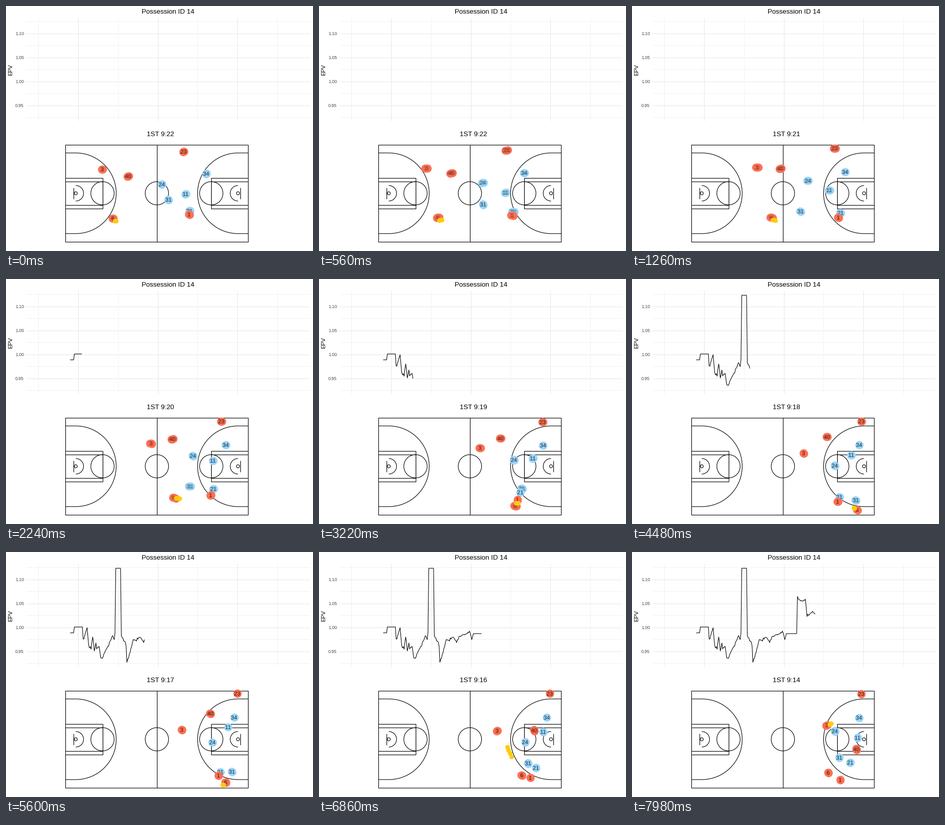
These frames come from a looping animation (600 by 480 pixels, 8000 ms). A matplotlib script:

```python
import numpy as np
import matplotlib.pyplot as plt
from matplotlib.animation import FuncAnimation
from matplotlib.collections import LineCollection, PathCollection
from matplotlib.textpath import TextPath
from matplotlib.transforms import Affine2D

W, H, DPI = 600, 480, 100
PX = 72 / DPI                 # points per pixel
TICK, LOOP, HOLD = 20, 8000, 140
FONT = "Liberation Sans"
RED, BLUE, GOLD = "#fd7053", "#9ad6fc", "#ffcb0a"

fig = plt.figure(figsize=(W / DPI, H / DPI), dpi=DPI, facecolor="white")
ax = fig.add_axes([0, 0, 1, 1])
ax.set_xlim(0.6, W + 0.6)
ax.set_ylim(H + 0.6, 0.6)
ax.axis("off")


def lines(segments, color, width):
    ax.add_collection(LineCollection(segments, colors=color,
                                     linewidths=width * PX), autolim=False)


def label(x, y, s, size, color="black", **kw):
    kw = {"ha": "center", "va": "baseline", **kw}
    return ax.text(x, y, s, fontsize=size * PX, family=FONT, color=color, **kw)


# ---- chart ----
def grid(xs, ys, width):
    lines([[(x, 24), (x, 226)] for x in xs] +
          [[(41, y), (594, y)] for y in ys], "#ebebeb", width)


grid(np.arange(64, 560, 155.5), np.arange(30.7, 226, 47), 0.65)
grid(np.arange(141.7, 460, 155.5), np.arange(54.2, 200, 47), 1.2)
for i, value in enumerate((1.10, 1.05, 1.00, 0.95)):
    label(35.7, 57.3 + 47 * i, f"{value:.2f}", 8.8, "#4d4d4d", ha="right")
label(317.5, 15.2, "Possession ID 14", 13.2)
label(10, 125.5, "EPV", 11, rotation=90, va="center")
clock = label(302, 255.5, "", 13.2)

# turning points of the curve: sample number, height
TURNS = np.array([
    (0, 159), (4, 159), (5, 147.5), (15, 147.5), (16, 174), (21, 150),
    (23, 184), (26, 191), (28, 166), (30, 195), (32, 181), (33, 189),
    (36, 184), (38, 209), (40, 208), (46, 189), (53, 165), (55, 171),
    (56, 161), (57, 32.5), (63, 32.5), (64, 165), (70, 182), (71, 217),
    (79, 175), (87, 168), (92, 178), (95, 166), (109, 157), (111, 172),
    (113, 160.5), (126, 160.5), (127, 86), (129, 94), (137, 97),
    (139, 125), (146, 118), (149, 122)])
sample = np.arange(150)
epv_x = 126.5 + 1.555 * sample
epv_y = np.interp(sample, *TURNS.T)
slope = np.diff(epv_y)
wobbly = np.append(0, slope) * np.append(slope, 0) != 0
epv_y += wobbly * np.random.default_rng(4).normal(0, 1.5, len(sample))
epv, = ax.plot([], [], color="black", lw=1.07 * PX)

# ---- court ----
FT = 3.8
LEFT, RIGHT, TOP, BOTTOM = 117, 474, 272.5, 462.5
MX, MY = 295.5, 367.5
HOOP = np.array([454, MY])


def arc(cx, cy, r, a=0, b=360):
    t = np.radians(np.linspace(a, b, 73))
    return np.column_stack([cx + r * np.cos(t), cy + r * np.sin(t)])


def half_court(edge, d):
    x = lambda ft: edge + d * ft * FT
    hoop, key = x(5.25), x(19)

    def facing(r):
        pts = arc(0, MY, r, -90, 90)
        pts[:, 0] = hoop + d * pts[:, 0]
        return pts

    three = facing(79)
    three = np.vstack([(edge, three[0, 1]), three, (edge, three[-1, 1])])
    parts = [three, facing(4 * FT), arc(hoop, MY, 3), arc(key, MY, 6 * FT),
             [(x(4), MY - 3 * FT), (x(4), MY + 3 * FT)]]
    for ft in (6, 8):
        h = ft * FT
        parts.append([(edge, MY - h), (key, MY - h),
                      (key, MY + h), (edge, MY + h)])
    return parts


box = [(LEFT, TOP), (RIGHT, TOP), (RIGHT, BOTTOM), (LEFT, BOTTOM), (LEFT, TOP)]
lines([box, [(MX, TOP), (MX, BOTTOM)], arc(MX, MY, 6 * FT)]
      + half_court(LEFT, 1) + half_court(RIGHT, -1), "black", 1.1)


# ---- movement ----
BEATS = {5: (0, 9, 23, 40, 57),
         6: (0, 9, 23, 40, 49, 57),
         7: (0, 9, 23, 32, 40, 49, 57)}


def route(*points):
    """Smooth path through points, starting gently."""
    beats = np.array(BEATS[len(points)], float)
    pts = np.array(points, float)
    vel = np.gradient(pts, beats, axis=0)
    vel[0] *= 0.5

    def at(t):
        i = np.clip(np.searchsorted(beats, t, "right") - 1, 0, len(beats) - 2)
        h = (beats[i + 1] - beats[i])[:, None]
        u = (t - beats[i])[:, None] / h
        p, q, v, w = pts[i], pts[i + 1], vel[i] * h, vel[i + 1] * h
        return (p + u * v + u**2 * (3 * (q - p) - 2 * v - w)
                + u**3 * (2 * (p - q) + v + w))

    return at


def guard(man, share, shift):
    """Stay between an opponent and the hoop."""
    return lambda t: man(t) * (1 - share) + HOOP * share + shift


red_team = {
    "23": route((347.5, 286), (396.5, 279.5), (437.5, 281),
                (452.5, 278), (448.5, 278.5)),
    "3": route((188.5, 320.5), (245, 317), (315, 331.5),
               (344, 349), (348.5, 351), (381.5, 340)),
    "40": route((239, 334), (290.5, 319), (355, 313), (400, 317), (439, 387)),
    "6": route((209.5, 416.5), (273, 415), (384, 445.5), (440.5, 453),
               (430, 452), (397, 438), (384, 433)),
    "1": route((358.5, 409), (404, 415), (388.5, 433),
               (416, 438.5), (407.5, 447)),
}
blue_team = {
    "34": guard(red_team["23"], 0.48, (-7, 4)),
    "24": route((305, 350), (344.5, 343), (381.5, 355),
                (404, 373.5), (403.5, 373), (397, 351.5)),
    "31": route((318, 380), (330, 403), (397, 411), (438, 434),
                (442, 431), (409, 414.5), (405.5, 403.5)),
    "11": route((351.5, 369), (386, 361.5), (418.5, 352),
                (434.5, 343.5), (441.5, 364.5)),
    "21": route((359, 402), (408, 406), (394, 418.5),
                (419.5, 431.5), (427, 413)),
}


def ball_at(t):
    """Dribbled around 6, then passed to 3."""
    angle = np.radians(45 - 9.5 * np.maximum(0, t - 12))
    hand = 7 * np.column_stack([np.cos(angle), np.sin(angle)])
    u = np.clip((t - 46.8) / 3.7, 0, 1)[:, None]
    return red_team["6"](t) * (1 - u) + red_team["3"](t) * u + hand


# ---- markers ----
def dots(color, size, z):
    return ax.plot([], [], "o", color=color, ms=size * PX, mew=0, zorder=z)[0]


def numbers(s):
    path = TextPath((0, 0), s, size=11, prop={"family": FONT})
    ext = path.get_extents()
    mid = (ext.min + ext.max) / 2
    path = path.transformed(Affine2D().translate(*-mid).scale(1 / DPI))
    art = PathCollection([path], offsets=np.zeros((1, 2)),
                         offset_transform=ax.transData,
                         facecolors=[(0, 0, 0, 0.26)], linewidths=0, zorder=2)
    art.set_transform(fig.dpi_scale_trans)
    ax.add_collection(art, autolim=False)
    return art


players = [(at, dots(color, 15.5, 2), numbers(num))
           for team, color in ((blue_team, BLUE), (red_team, RED))
           for num, at in team.items()]
ball = dots(GOLD, 9, 3)

TRAIL = np.linspace(-0.375, 0.375, 4)


def draw(frame):
    step = frame * TICK // HOLD
    times = step + TRAIL
    for at, dot, num in players:
        pos = at(times)
        dot.set_data(*pos.T)
        num.set_offsets(pos)
    ball.set_data(*ball_at(times).T)
    n = max(0, round(38 + 3.294 * (step - 23)))
    epv.set_data(epv_x[:n], epv_y[:n])
    clock.set_text(f"1ST 9:{22 - int((step + 3) / 7.5)}")
    return []


anim = FuncAnimation(fig, draw, frames=LOOP // TICK, interval=TICK,
                     repeat=True, repeat_delay=0)
plt.show()
```
